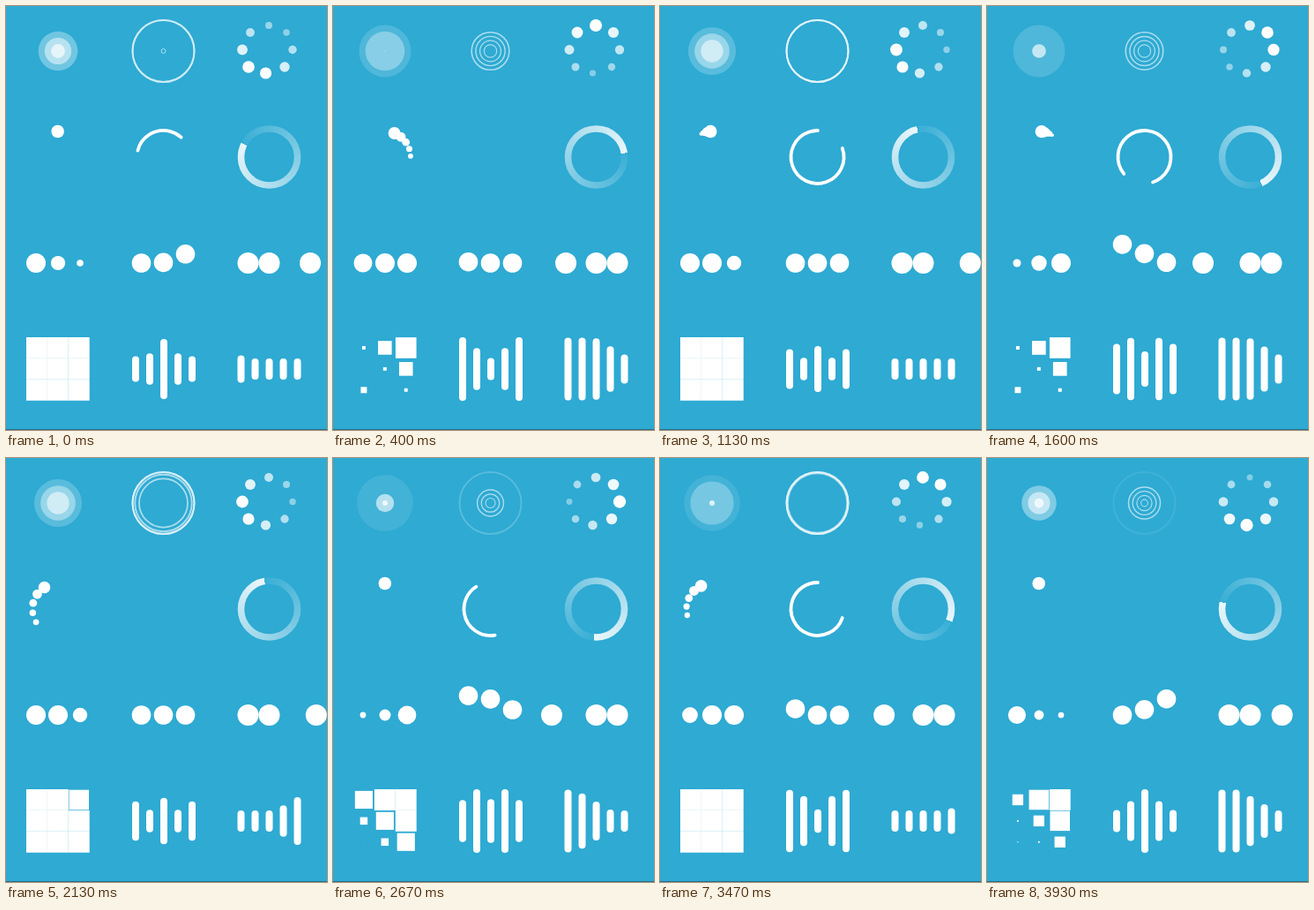
Write an HTML page with a canvas that moves like this. It is 364 px wide and 480 px high and loops after 3990 ms.

```html
<!DOCTYPE html>
<html lang="en">
<head>
<meta charset="utf-8">
<title>Loading indicators</title>
<style>
  html, body { margin: 0; width: 100%; height: 100%; overflow: hidden; background: #2eaad3; }
  canvas { display: block; width: 364px; height: 480px; }
</style>
</head>
<body>
<canvas id="stage"></canvas>
<script>
const W = 364, H = 480, LOOP = 3990, STEP = 66.5;
const canvas = document.getElementById('stage');
const ctx = canvas.getContext('2d');
const dpr = window.devicePixelRatio || 1;
canvas.width = W * dpr;
canvas.height = H * dpr;

const TAU = Math.PI * 2;
const mod = (a, n) => ((a % n) + n) % n;
const clamp = v => Math.min(1, Math.max(0, v));
const sineEase = v => (1 - Math.cos(Math.PI * clamp(v))) / 2;
const rad = deg => (deg - 90) * Math.PI / 180; // clockwise from the top
const white = a => `rgba(255,255,255,${a})`;

function bezier(x1, y1, x2, y2) {
  const at = (a, b, s) => 3 * a * s * (1 - s) ** 2 + 3 * b * s * s * (1 - s) + s ** 3;
  return x => {
    if (x <= 0) return 0;
    if (x >= 1) return 1;
    let lo = 0, hi = 1;
    for (let i = 0; i < 24; i++) {
      const mid = (lo + hi) / 2;
      if (at(x1, x2, mid) < x) lo = mid; else hi = mid;
    }
    return at(y1, y2, lo);
  };
}

function dot(x, y, r, alpha = 1) {
  if (r <= 0) return;
  ctx.fillStyle = white(alpha);
  ctx.beginPath();
  ctx.arc(x, y, r, 0, TAU);
  ctx.fill();
}

function arc(x, y, r, from, to, width, style) {
  ctx.strokeStyle = style;
  ctx.lineWidth = width;
  ctx.beginPath();
  ctx.arc(x, y, r, from, to);
  ctx.stroke();
}

function bar(x, height) {
  ctx.fillStyle = white(1);
  ctx.beginPath();
  ctx.roundRect(x - 4, 411 - height / 2, 8, height, 4);
  ctx.fill();
}

function pulse(t) {
  for (let i = 0; i < 3; i++) {
    const p = mod(t / 1000 + 0.62 - i * 0.2, 1);
    dot(59, 51, 36 * p, 0.8 * Math.min(p / 0.05, (1 - p) / 0.95));
  }
}

function ripple(t) {
  for (let i = 0; i < 5; i++) {
    const age = mod(t - i * 100, 1200);
    const grow = clamp(age / 690);
    const fade = clamp((1200 - age) / 500);
    arc(178.5, 51, 2.5 + 32.5 * grow, 0, TAU, 1 + grow, white(0.6 * fade));
  }
}

const ringDots = [[298, 22], [318, 30], [325, 49.5], [316, 69],
  [294.5, 76], [275, 69], [268, 49.5], [277, 30]];

function fadeRing(t) {
  const peak = 208 + t * 0.36;
  ringDots.forEach(([x, y], i) => {
    const near = Math.abs(mod(peak - i * 45, 360) - 180) / 180;
    dot(x, y, 3.4 + 3.8 * near, 0.4 + 0.6 * Math.min(1, near * 1.15));
  });
}

const chaseEase = [0, 1, 2, 3, 4].map(i => bezier(0.5, 0.15 + i / 5, 0.25, 1));

function chase(t) {
  const p = mod(t / 1300 - 0.185, 1);
  chaseEase.forEach((ease, i) => {
    const v = ease(p), from = 1 - i / 5, to = 0.2 + i / 5;
    const a = rad(360 * v);
    dot(59 + 29 * Math.cos(a), 171 + 29 * Math.sin(a), 7.3 * (from + (to - from) * v));
  });
}

const strokeEase = bezier(0.4, 0, 0.2, 1);

function strokeSpin(t) {
  const u = mod(t - 580, 1800);
  const head = 315 * strokeEase(u / 800);
  const tail = 315 * strokeEase((u - 900) / 800);
  if (head - tail < 9) return;
  const turn = 89 + 0.3 * t;
  ctx.lineCap = 'round';
  arc(178.5, 171, 30, rad(turn + tail + 2), rad(turn + head - 2), 3.8, white(1));
  ctx.lineCap = 'butt';
}

function gradientRing(t) {
  const g = ctx.createConicGradient(rad(mod(297 + 0.363 * t, 360)), 298.5, 171);
  g.addColorStop(0, white(0.05));
  g.addColorStop(1, white(0.9));
  arc(298.5, 171, 32, 0, TAU, 7.6, g);
}

function shrinkDots(t) {
  for (let i = 0; i < 3; i++) {
    const d = mod(t - i * 130 - 340, 1000) - 350;
    const size = sineEase(d < 0 ? -d / 350 : d / 310);
    dot(34 + i * 25, 291, 3.3 + 7.7 * size);
  }
}

function bounceDots(t) {
  for (let i = 0; i < 3; i++) {
    const d = Math.abs(mod(t - i * 105 - 140, 1000) - 500);
    dot(153.5 + i * 25, 291 - 22.3 * sineEase(1 - d / 285), 10.8);
  }
}

function cradle(t) {
  const swing = peak => {
    const d = Math.abs(mod(t - peak + 500, 1000) - 500);
    return d < 250 ? 29.5 * Math.cos(Math.PI * d / 500) : 0;
  };
  dot(274.5 - swing(592), 291, 12);
  dot(298.5, 291, 12);
  dot(322.5 + swing(112), 291, 12);
}

function cubeGrid(t) {
  const cell = 23.9;
  ctx.fillStyle = white(1);
  for (let row = 0; row < 3; row++) {
    for (let col = 0; col < 3; col++) {
      const u = mod(t - (col + 2 - row) * 95, 1200);
      const s = cell * (u < 285 ? 1 - sineEase(u / 285) : sineEase((u - 285) / 315));
      const x = 23 + cell * (col + 0.5), y = 375 + cell * (row + 0.5);
      ctx.fillRect(x - s / 2, y - s / 2, s, s);
    }
  }
}

function mirrorBars(t) {
  for (let i = 0; i < 5; i++) {
    const peak = 907 - 250 * Math.abs(i - 2);
    bar(147 + i * 16, 48.5 + 23.5 * Math.cos(TAU * (t - peak) / 1000));
  }
}

function waveBars(t) {
  for (let i = 0; i < 5; i++) {
    const u = mod(t + 37 - i * 97, 1200);
    bar(266.5 + i * 16, 24 + 47 * clamp(Math.min(u / 250, (739 - u) / 250)));
  }
}

const parts = [pulse, ripple, fadeRing, chase, strokeSpin, gradientRing,
  shrinkDots, bounceDots, cradle, cubeGrid, mirrorBars, waveBars];

function draw(t) {
  ctx.setTransform(dpr, 0, 0, dpr, 0, 0);
  ctx.fillStyle = '#2eaad3';
  ctx.fillRect(0, 0, W, H);
  ctx.fillStyle = '#2a6a82';
  ctx.fillRect(0, H - 1, W, 1);
  parts.forEach(part => part(t));
}

// The motion advances in even steps, about 15 per second.
const start = performance.now();
function tick() {
  const t = mod(performance.now() - start, LOOP);
  draw(Math.min(59, Math.floor((t + 5) / STEP)) * 66.6);
  requestAnimationFrame(tick);
}
tick();
</script>
</body>
</html>
```
